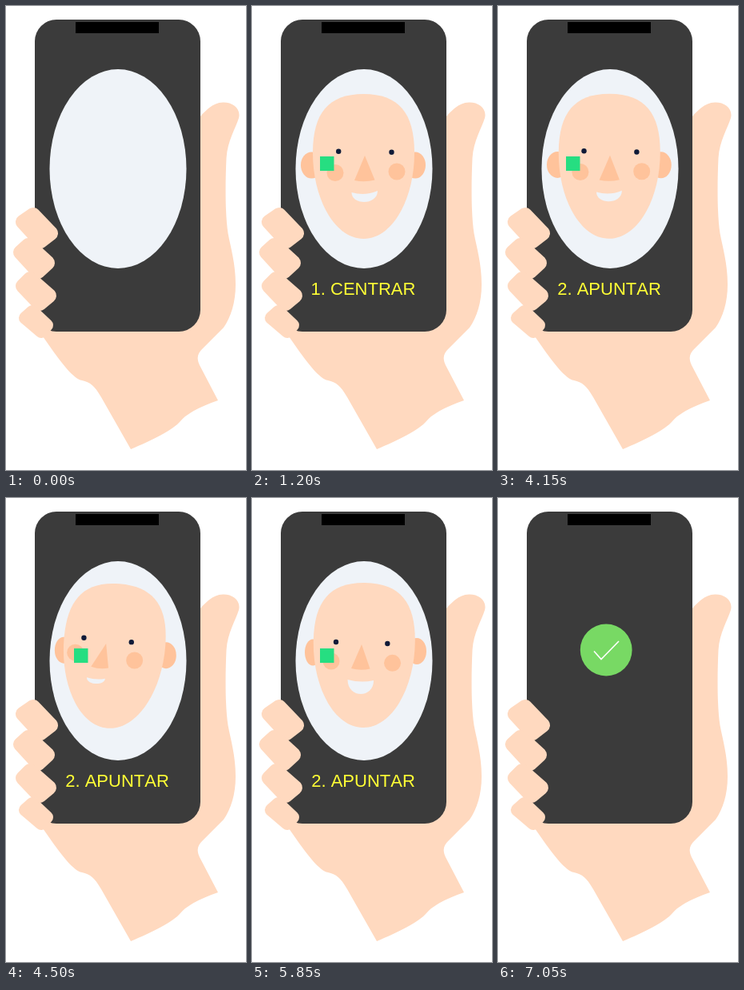
Recreate the animation shown at these times as an HTML page. Size 300 by 580 pixels, loop 8.05 s.

```html
<!DOCTYPE html>
<html lang="es">
<head>
<meta charset="utf-8">
<title>Verificación facial</title>
<style>
  html, body { margin: 0; width: 100%; height: 100%; overflow: hidden; background: #fff; }
  svg { display: block; width: 100%; height: 100%; }
  text { font: 22px "Liberation Sans", Arial, sans-serif; font-kerning: none; fill: #ffff35; }
  .skin { fill: #ffd9bf; }
  .blush { fill: #ffc39b; }
  .pale { fill: #eff3f8; }
  .eye { fill: #0f1a38; }
  .finger { fill: #ffd9bf; stroke: #ffd9bf; stroke-width: 18; stroke-linejoin: round; }
</style>
</head>
<body>
<svg viewBox="0 0 300 580">
  <path class="skin" d="M200 180 L243 138 C252 128 260 121 271 120.500 C283 120 294 128 291 140 C287 153 277 168 275.500 190 C274 222 274 262 277.500 284 C281 303 287 322 287 348 C287 371 281 389 272 402 L246 428 C239 435 238 440 242 449 L265 493 C245 500 226 509 218 519 C209 530 182 543 156 554 L119 489 C111 475 105 470 95 468 C84 466 70 446 60 433 L46 413 L60 380 Z"/>
  <rect x="36" y="17" width="207" height="390" rx="27" fill="#3b3b3b"/>
  <rect x="87" y="20" width="104" height="14"/>
  <ellipse id="oval" class="pale" cx="140" cy="203.500" rx="85.500" ry="124.500"/>
  <g id="face">
    <ellipse id="earL" class="blush" ry="16.500"/>
    <ellipse id="earR" class="blush" ry="16.500"/>
    <path id="head" class="skin" d="M0 -90.500 C44.500 -90.500 63 -66 63.500 -18.500 C64 39.500 36.500 90.500 0 90.500 C-36.500 90.500 -64 39.500 -63.500 -18.500 C-63 -66 -44.500 -90.500 0 -90.500Z"/>
    <circle id="cheekL" class="blush" r="10.500"/>
    <circle id="cheekR" class="blush" r="10.500"/>
    <path id="nose" class="blush"/>
    <circle id="eyeL" class="eye" r="3.200"/>
    <circle id="eyeR" class="eye" r="3.200"/>
    <path id="mouth" class="pale"/>
    <rect x="85" y="188" width="17.500" height="18" fill="#26de81"/>
  </g>
  <text id="step1" x="73.600" y="361">1. CENTRAR</text>
  <text id="step2" x="74.200" y="361">2. APUNTAR</text>
  <g id="done">
    <circle cx="135.200" cy="190" r="32.400" fill="#78d964"/>
    <path d="M120 191.500 L129 201.500 L151 179" fill="none" stroke="#fff" stroke-width="1.600"/>
  </g>
  <path class="finger" d="M34 261 L21 270 L43 294 L56 284Z"/>
  <path class="finger" d="M28 299 L18 308 L40 332 L52 321Z"/>
  <path class="finger" d="M30 341 L21 350 L42 372 L54 362Z"/>
  <path class="finger" style="stroke-width:16" d="M33 382 L24 390 L44 407 L51 399Z"/>
</svg>
<script>
const LOOP = 8050, STEP = 50;
const el = {};
document.querySelectorAll('[id]').forEach(n => el[n.id] = n);

// Each part lists x, y pairs; ears end with a width, the head with a tilt,
// the mouth with the heights of its upper and lower middle.
const front = {
  head: [139.5, 200.5, 0], earL: [74.5, 199, 13.5], earR: [204, 199, 13],
  eyeL: [108.2, 181.7], eyeR: [174.5, 182.7], cheekL: [104, 208.5], cheekR: [181, 207],
  nose: [141, 187, 128, 218, 153.5, 217.5], mouth: [124.5, 233, 157, 231, 235, 245]
};
const aim = {
  head: [133.5, 196, 6], earL: [72, 187, 10], earR: [199.7, 194.5, 12.5],
  eyeL: [94.5, 173], eyeR: [152, 179.5], cheekL: [82, 189], cheekR: [155.3, 202],
  nose: [121, 180, 101, 208, 121.5, 210.5], mouth: [95, 221, 116, 224, 223.5, 229.5]
};
const back = {
  head: [140, 196.5, 1], earL: [76, 193, 10], earR: [206, 191.5, 12],
  eyeL: [105, 180], eyeR: [169.3, 182], cheekL: [99, 204], cheekR: [175.5, 206.3],
  nose: [137, 183, 124, 213, 147.5, 213.5], mouth: [119.5, 227, 152, 228, 229.5, 245]
};
const smile = {
  head: [142.5, 196.5, 0], earL: [77.5, 195, 13.5], earR: [207, 195, 13],
  eyeL: [111.2, 177.7], eyeR: [177.5, 178.7], cheekL: [107, 204.5], cheekR: [184, 203],
  nose: [144, 183, 131, 214, 156.5, 213.5], mouth: [127, 228, 160, 227, 230, 246]
};

const mix = (a, b, p) => {
  const out = {};
  for (const k in a) out[k] = a[k].map((v, i) => v + (b[k][i] - v) * p);
  return out;
};
const ease = (t, from, to) => {
  const p = Math.min(1, Math.max(0, (t - from) / (to - from)));
  return p * p * (3 - 2 * p);
};
const turned = mix(aim, back, -0.3), returned = mix(aim, back, 1.06);

function poseAt(t) {
  if (t < 4150) return front;
  if (t < 5150) return mix(front, turned, ease(t, 4060, 4800));
  if (t < 5950) return mix(turned, returned, ease(t, 5150, 5950));
  return mix(returned, smile, ease(t, 5950, 6600));
}

const show = (node, on) => node.setAttribute('visibility', on ? 'visible' : 'hidden');
function place(id, [x, y, rx]) {
  el[id].setAttribute('cx', x);
  el[id].setAttribute('cy', y);
  if (rx) el[id].setAttribute('rx', rx);
}

function drawFace(p) {
  ['earL', 'earR', 'eyeL', 'eyeR', 'cheekL', 'cheekR'].forEach(id => place(id, p[id]));
  const [hx, hy, tilt] = p.head;
  el.head.setAttribute('transform', `translate(${hx} ${hy}) rotate(${tilt})`);
  const [tx, ty, ax, ay, bx, by] = p.nose;
  el.nose.setAttribute('d', `M${tx} ${ty} L${bx} ${by} Q${(ax + bx) / 2} ${(ay + by) / 2 + 3} ${ax} ${ay}Z`);
  const [lx, ly, rx, ry, top, low] = p.mouth;
  const upper = 2 * top - (ly + ry) / 2;
  const lower = (4 * low - (ly + ry) / 2) / 3;
  el.mouth.setAttribute('d',
    `M${lx} ${ly} Q${(lx + rx) / 2} ${upper} ${rx} ${ry} C${rx} ${lower} ${lx} ${lower} ${lx} ${ly}Z`);
}

function draw(t) {
  const done = t >= 7050;
  show(el.oval, !done);
  show(el.done, done);
  show(el.face, t >= 1200 && !done);
  show(el.step1, t >= 450 && t < 2300);
  show(el.step2, t >= 3150 && t < 5950);
  drawFace(poseAt(t));
}

const start = performance.now();
function tick() {
  const t = (performance.now() - start) % LOOP;
  draw(Math.floor(t / STEP) * STEP);
  requestAnimationFrame(tick);
}
tick();
</script>
</body>
</html>
```
